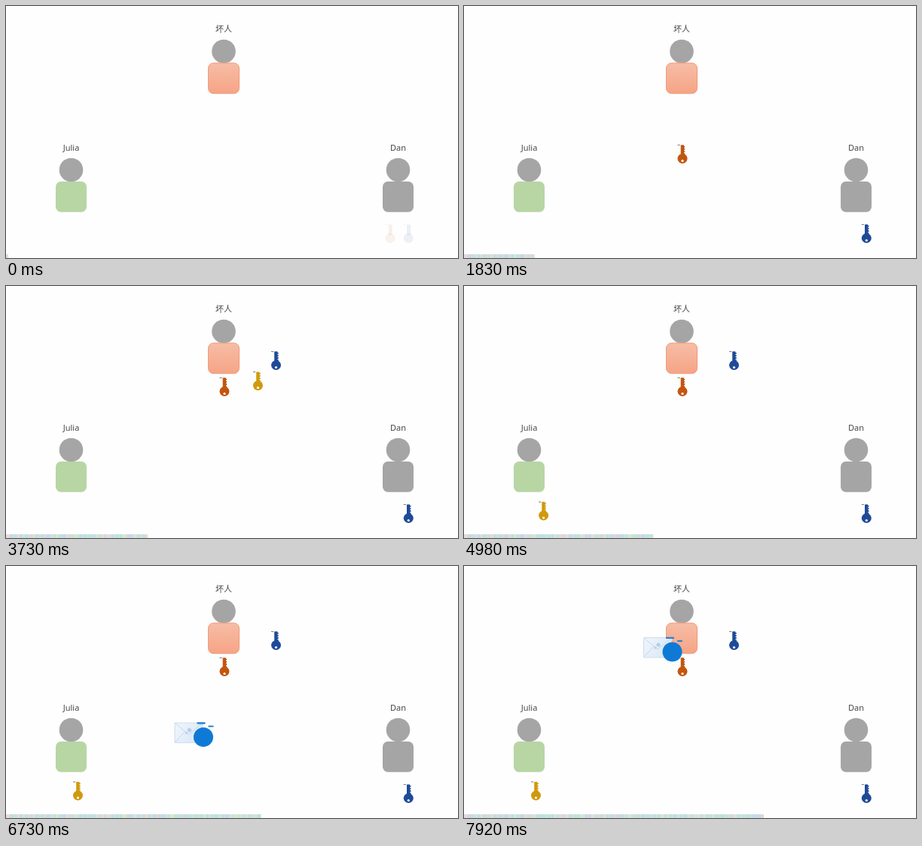
Recreate the animation shown at these times as an HTML page with a canvas. Size 600x336 px, loop 7990 ms.

```html
<!DOCTYPE html>
<html lang="zh">
<head>
<meta charset="utf-8">
<title>Key exchange</title>
<style>
html, body { margin: 0; width: 100%; height: 100%; overflow: hidden; background: #fefefe; }
canvas { display: block; width: 600px; height: 336px; }
</style>
</head>
<body>
<canvas id="stage"></canvas>
<script>
const W = 600, H = 336, LOOP = 7990, STEPS = 114;
const canvas = document.getElementById('stage');
const ctx = canvas.getContext('2d');
const dpr = window.devicePixelRatio || 1;
canvas.width = W * dpr;
canvas.height = H * dpr;
ctx.scale(dpr, dpr);

const GREY = '#a5a5a5', ORANGE = '#c2560f', BLUE = '#1f4a98', GOLD = '#d09a0e';
const FONT = '11px "Noto Sans", "Noto Sans CJK SC", "Noto Sans CJK", sans-serif';

const clamp = v => Math.max(0, Math.min(1, v));
const smooth = u => u * u * (3 - 2 * u);
const span = (t, start, length) => clamp((t - start) / length);

// Straight run, one bend, straight run; returns position by share of length.
function makeRoute(start, bendIn, corner, bendOut, end) {
  const pts = [start];
  for (let i = 0; i <= 40; i++) {
    const u = i / 40, v = 1 - u;
    pts.push([0, 1].map(k => v * v * bendIn[k] + 2 * u * v * corner[k] + u * u * bendOut[k]));
  }
  pts.push(end);
  const sums = [0];
  for (let i = 1; i < pts.length; i++) {
    sums.push(sums[i - 1] + Math.hypot(pts[i][0] - pts[i - 1][0], pts[i][1] - pts[i - 1][1]));
  }
  const total = sums[sums.length - 1];
  return share => {
    const s = share * total;
    let i = 1;
    while (i < pts.length - 1 && sums[i] < s) i++;
    const u = (s - sums[i - 1]) / (sums[i] - sums[i - 1]);
    return [0, 1].map(k => pts[i - 1][k] + (pts[i][k] - pts[i - 1][k]) * u);
  };
}

const orangeRoute = makeRoute([510, 309.5], [360, 309.5], [290, 309.5], [290, 236], [290, 140.5]);
const goldRoute = makeRoute([334.5, 105.5], [334.5, 215], [322, 275], [225, 306], [95.5, 306]);
const mailRoute = makeRoute([120, 240], [165, 240], [230, 232], [238, 165], [238, 94]);

function box(x, y, w, h, r, fill) {
  ctx.beginPath();
  ctx.roundRect(x, y, w, h, r);
  ctx.fillStyle = fill;
  ctx.fill();
}

function disc(x, y, r, fill) {
  ctx.beginPath();
  ctx.arc(x, y, r, 0, Math.PI * 2);
  ctx.fillStyle = fill;
  ctx.fill();
}

function person(name, x, y, fill, edge) {
  ctx.font = FONT;
  ctx.textAlign = 'center';
  ctx.textBaseline = 'alphabetic';
  ctx.fillStyle = '#484848';
  ctx.fillText(name, x, y - 25.5);
  disc(x, y, 15.8, GREY);
  box(x - 20.5, y + 15.5, 41, 40.7, 7, fill);
  if (edge) {
    ctx.strokeStyle = edge;
    ctx.lineWidth = 1;
    ctx.stroke();
  }
}

// Anchored at the centre of the bow.
function key(x, y, color, alpha) {
  if (alpha <= 0) return;
  ctx.save();
  ctx.globalAlpha = alpha;
  ctx.translate(x, y);
  disc(0, 0, 6.5, color);
  box(-2.3, -18.2, 4.3, 14, 0.8, color);
  for (const ty of [-16.8, -13.6, -10.4, -7.2]) box(1.5, ty, 1.7, 1.8, 0.3, color);
  disc(0, 3, 1.6, '#fff');
  ctx.fillStyle = '#8a8478';
  ctx.fillRect(-6.5, -18.6, 3.3, 1.1);
  ctx.restore();
}

// Anchored at the top left corner.
function mail(x, y, alpha) {
  if (alpha <= 0) return;
  ctx.save();
  ctx.globalAlpha = alpha;
  ctx.translate(x, y);
  const paper = ctx.createLinearGradient(0, 1, 36, 28);
  paper.addColorStop(0, '#f1f6fc');
  paper.addColorStop(1, '#d7e6f5');
  box(0.5, 1.5, 37, 26.5, 1, paper);
  ctx.strokeStyle = '#cbdcec';
  ctx.lineWidth = 1;
  ctx.stroke();
  ctx.beginPath();
  ctx.moveTo(1, 2);
  ctx.lineTo(19, 17);
  ctx.lineTo(37, 2);
  ctx.moveTo(1, 27.5);
  ctx.lineTo(14, 13);
  ctx.strokeStyle = '#c3d8ed';
  ctx.stroke();
  disc(20, 11, 2.6, '#b3cfea');
  disc(16, 15, 1.7, '#b9d3eb');
  disc(38.5, 20.5, 13, '#0f7ad6');
  box(30, 0.7, 11, 2.4, 0.4, '#2a83cf');
  box(45, 5, 7, 2, 0.4, '#2a83cf');
  ctx.restore();
}

function progress(step) {
  const tints = ['#c5e2df', '#d6e6cd', '#e5d2d5', '#bde3dc', '#c9d8e8', '#d9dfdd'];
  let seed = 29;
  const end = 3 + step * 3.496;
  for (let x = 0; x < end; x += 3.5) {
    seed = (seed * 16807) % 2147483647;
    ctx.fillStyle = x ? tints[seed % tints.length] : '#dedede';
    ctx.fillRect(x, 331, Math.min(3.6, end - x), 5);
  }
}

function draw(t) {
  ctx.fillStyle = '#fefefe';
  ctx.fillRect(0, 0, W, H);

  const skin = ctx.createLinearGradient(0, 76, 0, 118);
  skin.addColorStop(0, '#f6bda6');
  skin.addColorStop(1, '#f6a384');
  person('坏人', 289, 60.5, skin, '#f19b78');
  person('Julia', 86.5, 218.5, '#b8d5a4');
  person('Dan', 520.5, 218.5, GREY);

  const firstPair = span(t, -40, 500);
  const secondPair = span(t, 2600, 500);
  key(534.3, 309.5, BLUE, firstPair);
  key(...orangeRoute(smooth(span(t, 735, 1480))), ORANGE, firstPair);
  key(358.5, 105.5, BLUE, secondPair);
  key(...goldRoute(smooth(span(t, 3440, 1700))), GOLD, secondPair);
  mail(...mailRoute(smooth(span(t, 5780, 1910))), span(t, 5130, 500));
}

function frame(now) {
  const step = Math.floor((now % LOOP) / LOOP * STEPS + 0.02);
  draw(step * LOOP / STEPS);
  progress(step);
  requestAnimationFrame(tick);
}

let origin = null;
function tick(now) {
  if (origin === null) origin = now;
  frame(now - origin);
}
requestAnimationFrame(tick);
</script>
</body>
</html>
```
